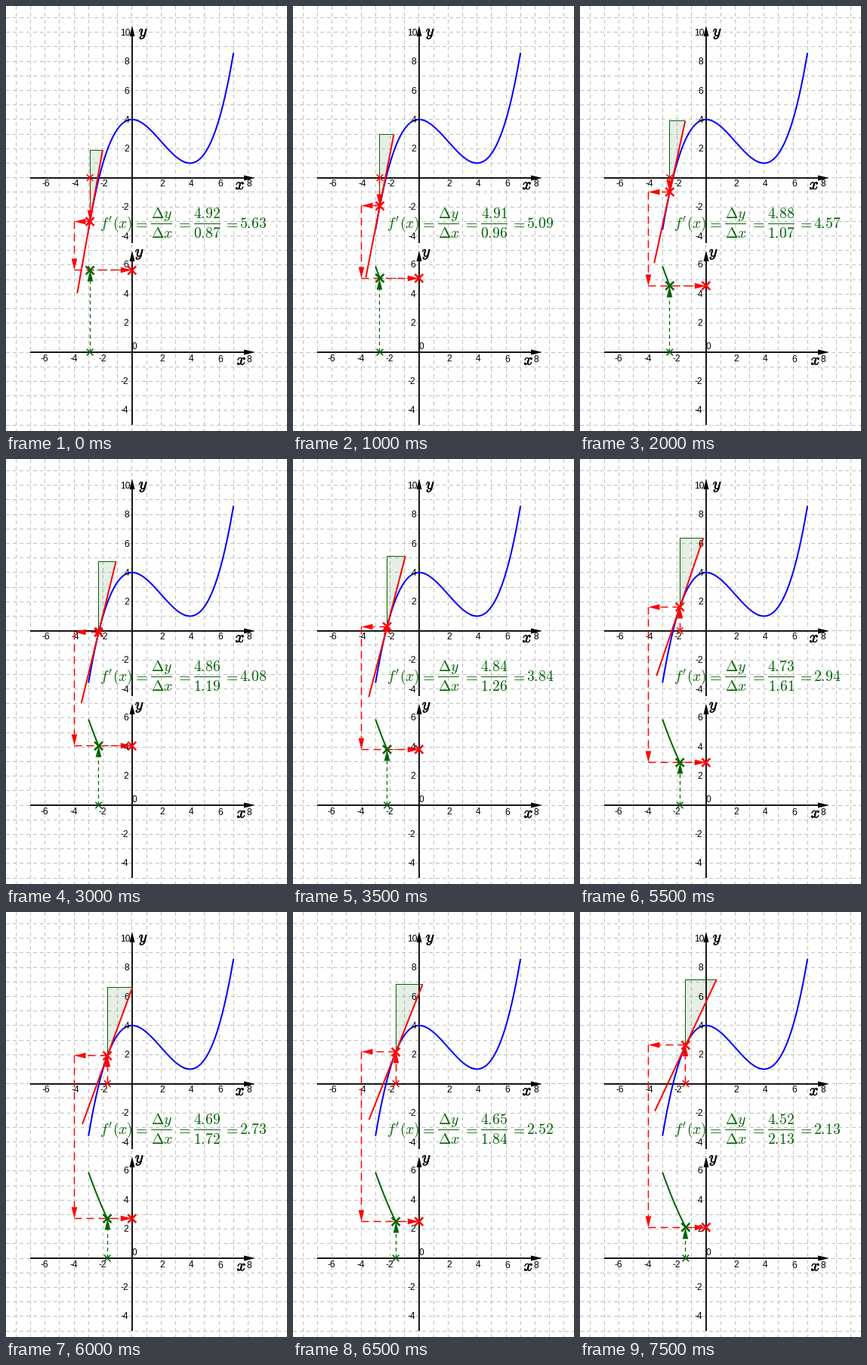
Write a matplotlib script that moves like this. It is 372 px wide and 561 px high and loops after 8 s.

```python
import numpy as np
import matplotlib.pyplot as plt
from matplotlib.animation import FuncAnimation
from matplotlib.patheffects import withStroke

plt.rcParams.update({
    "font.family": "Liberation Sans",
    "mathtext.fontset": "cm",
    "path.snap": False,
    "lines.scale_dashes": False,
    "lines.dash_capstyle": "butt",
    "lines.solid_capstyle": "butt",
})

W, H = 372, 561
UNIT = 19.2
OX, TOP, LOW = 166.8, 226.6, 457.0      # shared x origin, both y origins
RED, GREEN, BLUE = "#ff0000", "#006400", "#0000ff"
LONG, SHORT = (0, (10, 6)), (0, (5, 4))
FRAMES, STEP_MS = 16, 500

# At 72 dpi one point equals one pixel
fig = plt.figure(figsize=(W / 72, H / 72), dpi=72, facecolor="white")
ax = fig.add_axes([0, 0, 1, 1])
ax.set_xlim(0, W)
ax.set_ylim(H, 0)
ax.axis("off")


def f(x):
    return 3 / 32 * x**3 - 9 / 16 * x**2 + 4


def df(x):
    return 9 / 32 * x**2 - 9 / 8 * x


def px(x):
    return OX + UNIT * x


def py(y, origin):
    return origin - UNIT * y


def mid(v):
    """Centre of the pixel that holds v, for crisp thin lines."""
    return np.floor(v) + 0.5


def line(xs, ys, color, lw, z, dash="-"):
    return ax.plot(xs, ys, color=color, lw=lw, ls=dash, zorder=z)[0]


def arrow(p, q, color, lw, z, dash="-", head=15, half=3.8):
    p, q = np.array(p, float), np.array(q, float)
    dist = np.hypot(*(q - p))
    if dist < 0.5:
        return []
    u = (q - p) / dist
    n = np.array([-u[1], u[0]])
    base = q - u * min(head, dist)
    tip = ax.fill(*np.array([q, base + n * half, base - n * half]).T,
                  color=color, lw=0, zorder=z)
    return [line([p[0], base[0]], [p[1], base[1]], color, lw, z, dash), *tip]


def cross(x, y, r, color, lw, z):
    return [line([x - r, x + r], [y - s * r, y + s * r], color, lw, z)
            for s in (1, -1)]


def math(x, y, s, size=19.7, ha="center", color=GREEN, **kw):
    return ax.text(x, y, f"${s}$", size=size, ha=ha, va="baseline",
                   color=color, zorder=9, **kw)


def number(x, y, n, ha="center"):
    ax.text(x, y, str(n), size=12, ha=ha, va="baseline", zorder=4)


def draw_grid():
    for k in range(-8, 11):
        line([mid(px(k))] * 2, [0, H], "#c0c0c0", 1, 0, SHORT)
    for k in range(-5, 24):
        line([0, W], [mid(py(k, LOW))] * 2, "#c0c0c0", 1, 0, SHORT)


def draw_axes():
    x0 = round(OX)
    for origin, tip, end in ((TOP, 26, 313), (LOW, 323, 553)):
        y0 = round(origin)
        arrow((32, y0), (330, y0), "black", 1.8, 2, head=15, half=3.5)
        arrow((x0, end), (x0, tip), "black", 1.8, 2, head=14, half=3.5)
        for k in (-6, -4, -2, 2, 4, 6, 8):
            shift = 1.4 if k > 0 or origin == TOP else -0.3
            drop = 13 if origin == LOW and k > 4 else 11.5
            number(px(k) + shift, origin + drop, k)
    for k in (-4, -2, 2, 4, 6, 8):
        number(163, py(k, TOP) + 4.1, k, "right")
    number(165, py(10, TOP) + 4.5, 10, "right")
    for k in (-4, -2, 2, 4, 6):
        number(162.5, py(k, LOW) + 3.4, k, "right")
    number(170.3, 453.2, 0)

    bold = [withStroke(linewidth=0.6, foreground="black")]
    for x, y, s in ((310, 242, "x"), (182, 39.5, "y"),
                    (312, 473.5, "x"), (177, 330.5, "y")):
        math(x, y, s, 21, color="black", path_effects=bold)


def draw_formula_frame():
    math(124, 293, "f'(x)", ha="left")
    for x in (177.5, 235, 298):
        math(x, 293, "{=}")
    math(206, 280, r"\Delta y")
    math(206, 306, r"\Delta x")
    for a, b in ((192, 220), (249, 284)):
        line([a, b], [287.5] * 2, GREEN, 1, 9)


draw_grid()
draw_axes()
draw_formula_frame()
t = np.linspace(-3, 7, 300)
line(px(t), py(f(t), TOP), BLUE, 2, 3)

top_value = math(266.5, 280, "0")
low_value = math(266.5, 306, "0")
slope_value = math(309.3, 293, "0", ha="left")
moving = []


def update(i):
    while moving:
        moving.pop().remove()

    x = -2.9 + 0.1 * i
    m = df(x)
    dx = 5 / np.hypot(1, m)     # tangent reaches 5 units to each side
    dy = m * dx
    X, Y, D = px(x), py(f(x), TOP), py(m, LOW)
    Xr, Yt = X + UNIT * dx, Y - UNIT * dy

    # Slope triangle and tangent
    moving.extend(ax.fill([X, X, Xr], [Y, Yt, Yt], color=GREEN, alpha=0.1,
                          lw=0, zorder=1))
    moving.append(line([mid(X), mid(X), Xr], [Y, mid(Yt), mid(Yt)],
                       GREEN, 1, 4))
    moving.append(line([2 * X - Xr, Xr], [2 * Y - Yt, Yt], RED, 2, 5))

    # Derivative traced so far
    s = np.linspace(-3, x, 80)
    moving.append(line(px(s), py(df(s), LOW), GREEN, 2, 5))

    # Transfer path of the slope value
    xm, ym, dm, left = mid(X), mid(Y), mid(D), mid(px(-4))
    moving.append(line([xm, OX], [dm, dm], GREEN, 1, 5, SHORT))
    stops = [(xm, TOP), (xm, ym), (left, ym), (left, dm), (OX, dm)]
    for p, q in zip(stops, stops[1:]):
        moving.extend(arrow(p, q, RED, 1.5, 6, LONG))
    moving.extend(arrow((xm, LOW), (xm, dm), GREEN, 1.2, 6, SHORT))

    moving.extend(cross(X, TOP, 4.3, RED, 1.5, 7))
    moving.extend(cross(X, Y, 5.5, RED, 2.5, 7))
    moving.extend(cross(OX, D, 5.5, RED, 2.5, 7))
    moving.extend(cross(X, LOW, 4.3, GREEN, 1.5, 7))
    moving.extend(cross(X, D, 5.5, GREEN, 2.5, 8))

    for label, v in ((top_value, dy), (low_value, dx), (slope_value, m)):
        label.set_text(f"${v + 1e-9:.2f}$")
    return moving


anim = FuncAnimation(fig, update, frames=FRAMES, init_func=lambda: [],
                     interval=STEP_MS, repeat=True, repeat_delay=0, blit=False)
plt.show()
```
